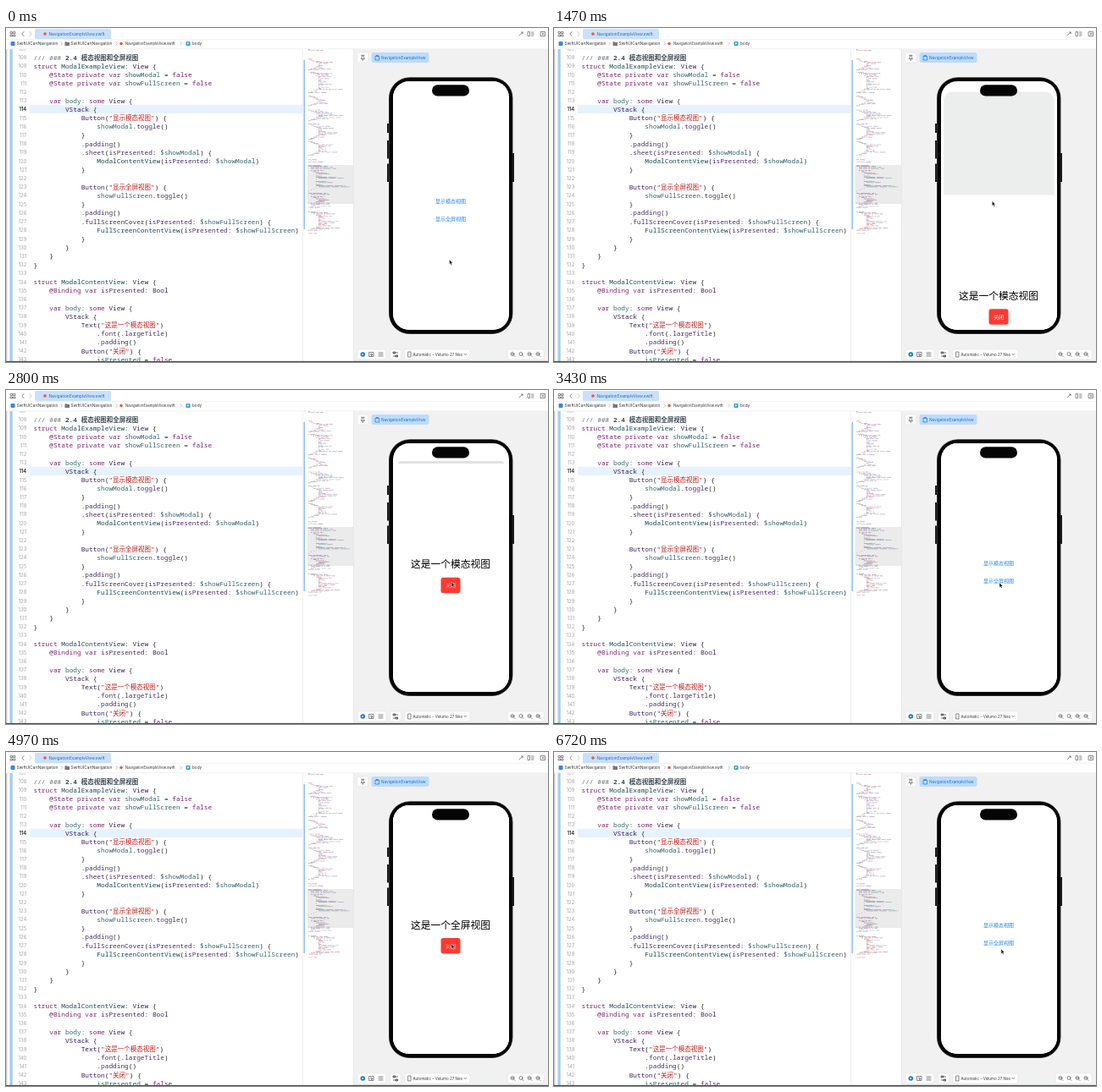
These frames come from a looping animation (640x395 px, 6790 ms). An HTML page:

```html
<!DOCTYPE html>
<html lang="zh">
<head>
<meta charset="utf-8">
<title>Modal and full screen views</title>
<style>
  html, body { margin: 0; width: 100%; height: 100%; overflow: hidden; background: #fff; }
  svg { display: block; width: 640px; height: 395px; }
  text { font-family: Inter, 'Noto Sans', sans-serif; white-space: pre; }
  .code text { font: 7.8px 'Noto Sans Mono', 'DejaVu Sans Mono', monospace; }
  .code .cjk { font-size: 7.5px; }
  .cjk { font-family: 'Noto Sans CJK SC', 'Noto Sans CJK JP', sans-serif; }
  .nums text { font-size: 5.9px; fill: #a3a3a6; text-anchor: end; }
  .icon { fill: none; stroke: #5b5b5f; stroke-width: .7; stroke-linecap: round; stroke-linejoin: round; }
  .mid { text-anchor: middle; }
  .link { font-size: 6px; fill: #2086ee; text-anchor: middle; }
  .title { font-size: 11.75px; text-anchor: middle; }
  .label { font-size: 6px; fill: #fff; text-anchor: middle; }
  .pill { fill: #fcfcfc; stroke: #dededf; stroke-width: .5; }
</style>
</head>
<body>
<svg viewBox="0 0 640 395">
  <defs>
    <clipPath id="editorClip"><rect y="25" width="350" height="369"/></clipPath>
    <clipPath id="screenClip"><rect x="457" y="63" width="137" height="294" rx="19"/></clipPath>
  </defs>
  <rect width="640" height="395" fill="#fff"/>

  <!-- editor -->
  <g clip-path="url(#editorClip)">
    <rect x="28" y="90.700" width="322" height="10.2" fill="#e6f2fd"/>
    <rect y="25" width="1.3" height="369" fill="#c3c6ca"/>
    <rect x="4.5" y="25" width="3.2" height="369" fill="#a5caf0"/>
    <g class="nums" id="nums"></g>
    <g class="code" id="code"></g>
  </g>

  <!-- minimap -->
  <rect x="350" y="25" width=".6" height="369" fill="#e4e4e6"/>
  <rect x="355.500" y="162" width="54.500" height="46" fill="#ebebec"/>
  <rect x="351.600" y="38" width="1.2" height="200" fill="#79afe9"/>
  <g id="minimap" opacity=".5"></g>

  <!-- top bars -->
  <rect width="640" height="25" fill="#fff"/>
  <rect x="34" y="1" width="90" height="12" rx="1.5" fill="#c9e0fb"/>
  <path d="M0 13.300H640M0 24.700H640" stroke="#e7e7e9" stroke-width=".6"/>
  <circle cx="46" cy="7" r="1.800" fill="#f0533c"/>
  <text x="50.500" y="8.800" font-size="4.8" fill="#176fd0">NavigationExampleView.swift</text>
  <g class="icon">
    <path d="M5.500 4.500h2v2h-2zM9 4.500h2v2H9zM5.500 8h2v2h-2zM9 8h2v2H9zM21 4.500l-2.200 2.500 2.200 2.500"/>
    <path d="M28 4.500l2.200 2.500-2.200 2.500" stroke="#b5b5b8"/>
    <path d="M606 8.800l4-3.600M608.500 5h1.700v1.600M616.500 4.500h2v5h-2zM620.500 5h2.500M620.500 7h2.500M620.500 9h2.500M631.500 4.500h5v5h-5zM634 6v2M633 7h2"/>
    <path d="M65 16.700l1.500 1.800-1.500 1.800M130 16.700l1.500 1.800-1.500 1.800M206 16.700l1.500 1.800-1.500 1.800" stroke="#aaa"/>
  </g>
  <rect x="5.500" y="16" width="5" height="5" rx="1" fill="#3784e8"/>
  <path d="M69.500 16.300h2l.7.8h2.800v4h-5.500z" fill="#77777b"/>
  <circle cx="136" cy="18.500" r="1.800" fill="#f0533c"/>
  <rect x="212.500" y="16" width="5" height="5" rx="1" fill="#2b9ed0"/>
  <text class="mid" x="215" y="20" font-size="4" font-weight="700" fill="#fff">P</text>
  <g font-size="4.7" fill="#37373a">
    <text x="12.500" y="20.200">SwiftUICartNavigation</text>
    <text x="76.500" y="20.200">SwiftUICartNavigation</text>
    <text x="141" y="20.200" font-size="4.250">NavigationExampleView.swift</text>
    <text x="220" y="20.200">body</text>
  </g>

  <!-- preview panel -->
  <rect x="410.500" y="25" width="229.500" height="369" fill="#f1f1f2"/>
  <rect x="410" y="25" width=".6" height="369" fill="#dfdfe1"/>
  <rect class="pill" x="414.500" y="29" width="13.500" height="12" rx="2.500"/>
  <path class="icon" d="M419.800 32.300h3M420.300 32.300v2.500l-1.200 1.700h4.400l-1.200-1.700v-2.500M421.300 36.500v2.200"/>
  <rect x="431.500" y="29" width="68" height="12" rx="2.500" fill="#bddbfb"/>
  <path d="M436 33.500h4.500v4.500H436zM437 33.500v-1h2.500v1" fill="none" stroke="#1873dc" stroke-width=".7"/>
  <text x="443" y="36.900" font-size="4.650" fill="#1873dc">NavigationExampleView</text>

  <g class="pill">
    <rect x="415" y="380" width="34" height="12" rx="2.500"/>
    <rect x="453.500" y="380" width="13" height="12" rx="2.500"/>
    <rect x="470.500" y="380" width="77.500" height="12" rx="2.500"/>
    <rect x="592" y="380" width="43.500" height="12" rx="2.500"/>
  </g>
  <circle cx="421.300" cy="386" r="2.800" fill="#1b76e2"/>
  <path d="M420.500 384.700l2.100 1.300-2.100 1.300z" fill="#fff"/>
  <g class="icon">
    <path d="M429 383.500h5v5h-5zM431 385.300l2.200 1-1 .4-.4 1zM440 384h5M440 386h5M440 388h5"/>
    <path d="M457.500 384h5M457.500 388h5M457.500 383h2v2h-2zM460.500 387h2v2h-2z" stroke="#333"/>
    <path d="M475 383h3v6h-3zM541 385.300l1.300 1.400 1.300-1.400"/>
    <g id="zooms"></g>
  </g>
  <text x="480.500" y="387.700" font-size="4.500" fill="#3a3a3d">Automatic – Velumo 27 Neo</text>

  <!-- phone -->
  <path d="M451 113v11M451 133v21.500M451 160.500v21.500M599 148v34" stroke="#1c1c1e" stroke-width="2"/>
  <rect x="452.500" y="58.800" width="145.500" height="302.700" rx="24" fill="#050506" stroke="#1c1c1e" stroke-width=".8"/>
  <rect x="457" y="63" width="137" height="294" rx="19" fill="#fff"/>
  <g clip-path="url(#screenClip)">
    <g id="home">
      <rect id="card" x="457" y="63" width="137" height="294" fill="#fff"/>
      <text class="link cjk" x="525" y="207.200">显示模态视图</text>
      <text class="link cjk" x="525" y="227.700">显示全屏视图</text>
      <rect id="dim" x="457" y="63" width="137" height="294" fill="#0c1410"/>
    </g>
    <g id="sheet">
      <rect x="457" y="87" width="137" height="300" rx="4" fill="#fff"/>
      <text class="title cjk" x="525" y="210.200">这是一个模态视图</text>
      <rect x="513.500" y="221.800" width="23" height="18.500" rx="3" fill="#fd3a31"/>
      <text class="label cjk" x="525" y="233.300">关闭</text>
    </g>
    <g id="cover">
      <rect x="457" y="63" width="137" height="294" fill="#fff"/>
      <text class="title cjk" x="525" y="209.200">这是一个全屏视图</text>
      <rect x="513.500" y="220" width="23" height="18.500" rx="3" fill="#fd3a31"/>
      <text class="label cjk" x="525" y="231.500">关闭</text>
    </g>
  </g>
  <rect x="503" y="67.300" width="44" height="13.200" rx="6.600" fill="#050506"/>

  <path id="cursor" d="M0 0V5.600L1.300 4.500L2.200 6.500L3.200 6.050L2.350 4.100H4Z" fill="#000" stroke="#fff" stroke-width=".5"/>
  <rect y="393.900" width="640" height="1.100" fill="#0b7a1c"/>
</svg>

<script>
const $ = id => document.getElementById(id);
const FIRST_LINE = 108, LINE_HEIGHT = 10.21, CURRENT_LINE = 114;
const source = `/// ### 2.4 模态视图和全屏视图
struct ModalExampleView: View {
    @State private var showModal = false
    @State private var showFullScreen = false

    var body: some View {
        VStack {
            Button("显示模态视图") {
                showModal.toggle()
            }
            .padding()
            .sheet(isPresented: $showModal) {
                ModalContentView(isPresented: $showModal)
            }

            Button("显示全屏视图") {
                showFullScreen.toggle()
            }
            .padding()
            .fullScreenCover(isPresented: $showFullScreen) {
                FullScreenContentView(isPresented: $showFullScreen)
            }
        }
    }
}

struct ModalContentView: View {
    @Binding var isPresented: Bool

    var body: some View {
        VStack {
            Text("这是一个模态视图")
                .font(.largeTitle)
                .padding()
            Button("关闭") {
                isPresented = false`.split('\n');

const rules = [
  [/^\/\/\/ ### $/, '#6d7680'],
  [/^2\.4/, '#3f4a55', 700],
  [/^"/, '#c41a16', 500],
  [/^(struct|private|var|some|false|@State|@Binding)$/, '#7c2672', 500],
  [/^(View|VStack|Button|Text|Bool)$/, '#38205f', 500],
  [/^(toggle|padding|sheet|font|fullScreenCover|largeTitle|isPresented:)$/, '#483069'],
  [/^[A-Z]/, '#1c4a58', 500],
  [/^\$?[a-z]/, '#35666d']
];
const tokenize = line =>
  (line.match(/\/\/\/ ### |2\.4.*|"[^"]*"|[@$]?\w+:?|\s+|[^\w\s]/g) || []).map(word => {
    const name = /^[A-Z]\w*:$/.test(word) ? word.slice(0, -1) : word;
    const [, fill = '#262628', weight = 450] = rules.find(([re]) => re.test(name)) || [];
    return { word, fill, weight };
  });

const esc = s => s.replace(/&/g, '&amp;').replace(/</g, '&lt;');
const markCjk = s => esc(s).replace(/[\u4e00-\u9fff]+/g, run => `<tspan class="cjk">${run}</tspan>`);
const span = ({ word, fill, weight }) =>
  `<tspan fill="${fill}" font-weight="${weight}">${markCjk(word)}</tspan>`;

let numsHtml = '', codeHtml = '';
['', ...source].forEach((line, i) => {
  const n = FIRST_LINE - 1 + i, y = 27.3 + i * LINE_HEIGHT;
  const style = n === CURRENT_LINE ? ' style="fill:#222;font-weight:600"' : '';
  numsHtml += `<text x="24.3" y="${y - .4}"${style}>${n}</text>`;
  codeHtml += `<text x="32.5" y="${y}">${tokenize(line).map(span).join('')}</text>`;
});
$('nums').innerHTML = numsHtml;
$('code').innerHTML = codeHtml;

// Minimap: the visible lines in miniature, seeded filler elsewhere.
let seed = 17;
const random = () => (seed = seed * 16807 % 2147483647) / 2147483647;
const bar = (line, col, len, fill) =>
  `<rect x="${357 + col * .74}" y="${25 + (line - 1) * 1.28}" width="${len * .74}" height=".65" fill="${fill}"/>`;
const palette = ['#7c2672', '#38205f', '#35666d', '#777', '#777', '#483069', '#c41a16'];
const blocks = [[1, 2], [10, 20], [22, 41], [44, 53], [57, 67], [70, 84], [86, 99], [103, 105], [143, 147], [151, 168], [171, 171]];
let mapHtml = '';
source.forEach((line, i) => {
  let col = 0;
  for (const { word, fill } of tokenize(line)) {
    if (word.trim()) mapHtml += bar(FIRST_LINE + i, col, word.length * .9, fill);
    col += word.length;
  }
});
for (const [from, to] of blocks) {
  for (let n = from; n <= to; n++) {
    let col = Math.min(n - from, to - n, 4) * 4;
    const end = col + 1 + random() ** 2 * 38;
    while (col < end) {
      const len = 1 + random() * 8;
      mapHtml += bar(n, col, len, palette[Math.floor(random() * palette.length)]);
      col += len + 1.5;
    }
  }
}
$('minimap').innerHTML = mapHtml;
$('zooms').innerHTML = [598, 608, 618, 628].map((x, i) =>
  `<circle cx="${x}" cy="385.500" r="2"/><path d="M${x + 1.5} 387l1.500 1.500${i === 1 ? '' : `M${x - .9} 385.500h1.800`}"/>`).join('');

const LOOP = 6790, STEP = 70;
const cursorPath = [
  [0, 523.5, 274], [350, 520, 243], [490, 520, 243], [1120, 517.5, 205], [2030, 517, 204],
  [2590, 526, 227], [3430, 526, 228], [3710, 526, 228], [3920, 526, 227], [5600, 526, 227],
  [5950, 527, 230], [6160, 527, 230], [6440, 528, 233], [LOOP, 528, 233]
];
const lerp = (a, b, k) => a + (b - a) * k;
const smooth = k => k * k * (3 - 2 * k);

// Critically damped spring from 0 to 1.
function spring(t, start) {
  const x = Math.max(0, t - start) * .014;
  return 1 - (1 + x) * Math.exp(-x);
}
const shown = (t, open, close) => spring(t, open) - spring(t, close);

function cursorAt(t) {
  const i = cursorPath.findIndex(([end]) => end > t);
  const [t0, x0, y0] = cursorPath[i - 1], [t1, x1, y1] = cursorPath[i];
  const k = smooth((t - t0) / (t1 - t0));
  return [lerp(x0, x1, k), lerp(y0, y1, k)];
}

function slide(id, amount, distance, t, pressAt) {
  const group = $(id);
  group.setAttribute('transform', `translate(0 ${distance * (1 - amount)})`);
  group.setAttribute('visibility', amount > .0005 ? 'visible' : 'hidden');
  const pressed = t >= pressAt && t < pressAt + 140;
  group.querySelector('.label').setAttribute('opacity', pressed ? .6 : 1);
}

function draw(t) {
  const modal = shown(t, 1328, 2812);
  const scale = 1 - .08 * modal;
  $('home').setAttribute('transform',
    `translate(${525.5 * (1 - scale)} ${63 + 21 * modal - 63 * scale}) scale(${scale})`);
  const radius = lerp(19, 5, modal);
  $('card').setAttribute('rx', radius);
  $('dim').setAttribute('rx', radius);
  $('dim').setAttribute('opacity', .125 * modal);
  slide('sheet', modal, 270, t, 2800);
  slide('cover', shown(t, 4198, 4982), 294, t, 4970);
  $('cursor').setAttribute('transform', `translate(${cursorAt(t).join(' ')})`);
}

const began = performance.now();
function tick() {
  const t = (performance.now() - began) % LOOP;
  draw(Math.floor(t / STEP) * STEP);
  requestAnimationFrame(tick);
}
tick();
</script>
</body>
</html>
```
